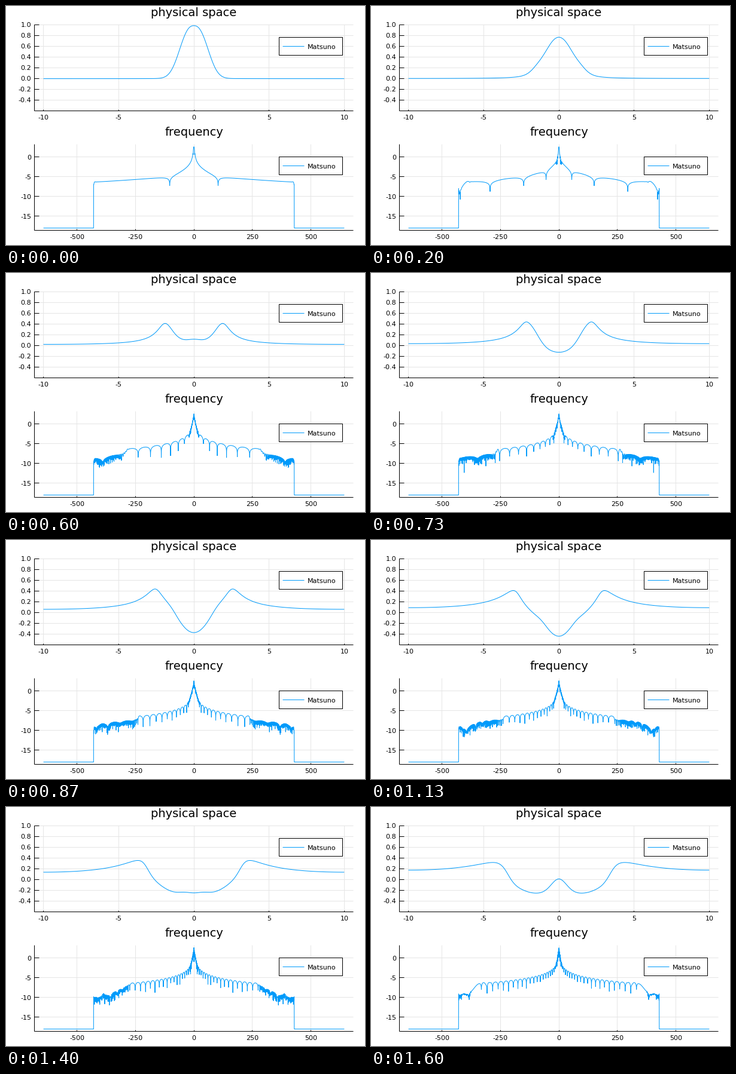
Animation of 600x400 px, one loop 1.67 s. Source, as a matplotlib script:

```python
import numpy as np
import matplotlib.pyplot as plt
from matplotlib.animation import FuncAnimation
from matplotlib.patches import Rectangle

W, H = 600, 400
FRAMES, LOOP = 25, 1670
LEFT, RIGHT = 47.5, 580.5
HEIGHT = 144.2
BLUE = "#009afa"

# Matsuno deep-water model, solved pseudo-spectrally
N, L, EPS = 4096, 10, 0.5
DT, STEPS = 0.005, 40
x = -L + 2 * L * np.arange(N) / N
k = 2 * np.pi * np.fft.rfftfreq(N, 2 * L / N)
keep = k < k[-1] * 2 / 3
dx = 1j * k
hilbert = -1j * np.sign(k)


def to_x(f):
    return np.fft.irfft(f, N)


def product(a, b):
    return keep * np.fft.rfft(a * b)


def rhs(state):
    h, u = state
    hx, ux = to_x(h), to_x(u)
    flux = dx * product(hx, ux) + hilbert * product(hx, to_x(k * u))
    slope = product(to_x(dx * h), to_x(k * h))
    return np.array([hilbert * u - EPS * flux,
                     -dx * h + EPS * slope - EPS / 2 * dx * product(ux, ux)])


def rk4(s):
    a = rhs(s)
    b = rhs(s + DT / 2 * a)
    c = rhs(s + DT / 2 * b)
    d = rhs(s + DT * c)
    return s + DT / 6 * (a + 2 * b + 2 * c + d)


def solve():
    bell = keep * np.fft.rfft(2 ** -np.abs(x) ** 2.5)
    state = np.array([bell, np.zeros_like(bell)])
    waves, spectra = [], []
    for _ in range(FRAMES):
        for _ in range(STEPS):
            state = rk4(state)
        size = np.log10(1e-18 + np.abs(state[0]))
        waves.append(to_x(state[0]))
        spectra.append(np.concatenate([size[:0:-1], size[:-1]]))
    return waves, spectra


plt.rcParams.update({"font.family": "DejaVu Sans", "path.simplify": False})
fig = plt.figure(figsize=(W / 100, H / 100), dpi=100, facecolor="white")


def panel(title, top, xlim, ylim, xticks, yticks, yformat):
    bottom = top + HEIGHT
    ax = fig.add_axes([LEFT / W, 1 - bottom / H,
                       (RIGHT - LEFT) / W, HEIGHT / H])
    ax.set(xlim=xlim, ylim=ylim)
    ax.axis("off")

    def px(v):
        return LEFT + (v - xlim[0]) / (xlim[1] - xlim[0]) * (RIGHT - LEFT)

    def py(v):
        return bottom - (v - ylim[0]) / (ylim[1] - ylim[0]) * HEIGHT

    def stroke(xs, ys, color="black", z=1):
        # the half pixel makes snapping pick the pixel that holds the point
        fig.add_artist(plt.Line2D((np.array(xs) - 0.5) / W,
                                  1 - (np.array(ys) - 0.5) / H,
                                  color=color, lw=0.72, zorder=z,
                                  solid_capstyle="butt"))

    def label(tx, ty, s, size=8, ha="center"):
        fig.text(tx / W, 1 - ty / H, s, size=size, ha=ha, va="baseline",
                 zorder=3)

    for v in xticks:
        stroke([px(v)] * 2, [top, bottom], "#e5e5e5", z=-2)
        stroke([px(v)] * 2, [bottom - 2.2, bottom])
        label(px(v), bottom + 14.4, f"{v}")
    for v in yticks:
        stroke([LEFT, RIGHT], [py(v)] * 2, "#e5e5e5", z=-2)
        stroke([LEFT, LEFT + 8], [py(v)] * 2)
        label(42, py(v) + 3.8, format(v, yformat), ha="right")
    stroke([LEFT, LEFT], [top, bottom])
    stroke([LEFT, RIGHT], [bottom, bottom])
    label((LEFT + RIGHT) / 2, top - 14.3, title, size=14)

    # legend
    mid = top + 36
    fig.add_artist(Rectangle((456 / W, 1 - (mid + 14.5) / H), 106 / W, 30 / H,
                             fc="white", ec="black", lw=0.72, zorder=2))
    stroke([462, 498], [mid, mid], BLUE, z=3)
    label(504, mid + 4.5, "Matsuno", ha="left")

    line, = ax.plot([], [], color=BLUE, lw=0.72, solid_joinstyle="miter",
                    solid_capstyle="butt", clip_on=False)
    return line


waves, spectra = solve()
freq = np.concatenate([-k[:0:-1], k[:-1]])
wave_line = panel("physical space", 31.5, (-10.6, 10.6), (-0.6, 1),
                  range(-10, 11, 5), np.arange(-2, 6) / 5, ".1f")
freq_line = panel("frequency", 231.5, (-682, 681.7), (-18.619, 3.241),
                  range(-500, 501, 250), range(-15, 1, 5), "d")


def draw(i):
    wave_line.set_data(x, waves[i])
    freq_line.set_data(freq, spectra[i])
    return wave_line, freq_line


anim = FuncAnimation(fig, draw, frames=FRAMES, interval=LOOP / FRAMES,
                     repeat=True, repeat_delay=0)
plt.show()
```
